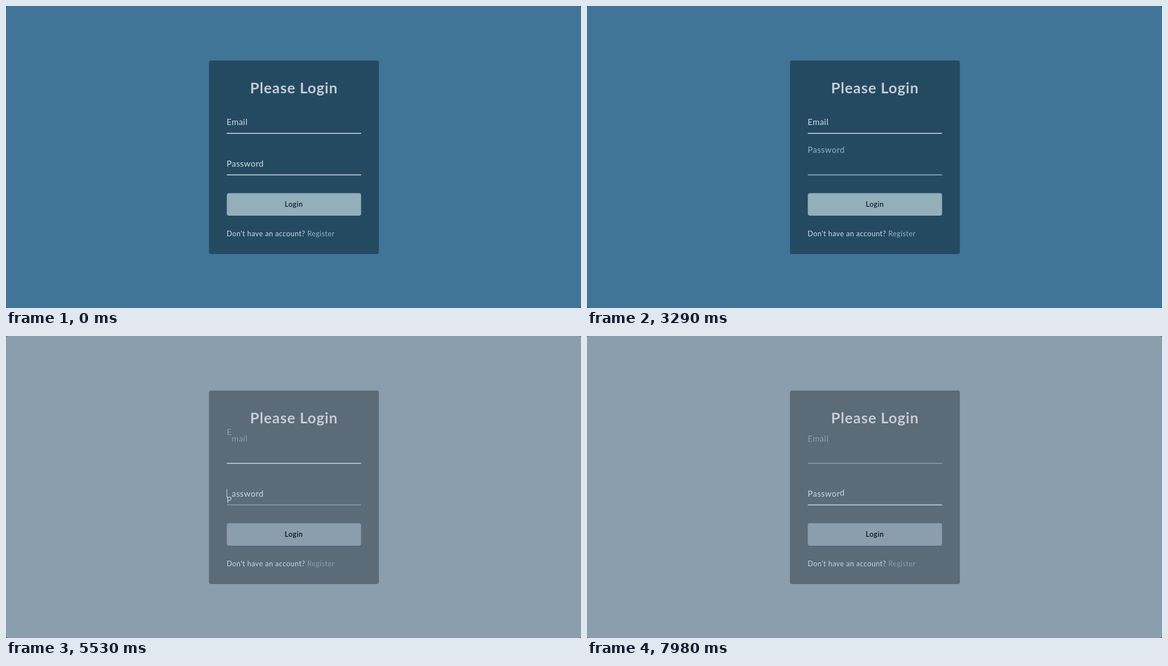
These frames come from a looping animation (1032x543 px, 8000 ms). An HTML page:

```html
<!DOCTYPE html>
<html lang="en">
<head>
<meta charset="utf-8">
<title>Login form</title>
<style>
  html, body { margin: 0; width: 100%; height: 100%; overflow: hidden; background: #2b3c4a; }
  svg {
    display: block; width: 1032px; height: 543px; font-family: Lato, sans-serif;
    --bg: #407598; --card: #244a62; --button: #93afba; --ink: #06182c;
    --title: #c6cad5; --text: #cddbe4; --accent: #8fb2c9;
  }
  svg.muted {
    --bg: #8b9eae; --card: #5b6b78; --button: #8b9eae; --ink: #05080c;
    --title: #c8cbd2; --text: #c9d5df; --accent: #8b9eae;
  }
  .bg { fill: var(--bg); }
  .card { fill: var(--card); }
  .button { fill: var(--button); }
  .title { fill: var(--title); font-size: 26.5px; font-weight: 700; letter-spacing: .9px; }
  .label { font-size: 15px; letter-spacing: .45px; }
  .small { fill: var(--text); font-size: 12.8px; letter-spacing: .45px; }
  .ink { fill: var(--ink); font-weight: 500; }
  .link { fill: var(--accent); }
  .line, .caret { fill: var(--text); }
  .line.focus { fill: var(--accent); }
</style>
</head>
<body>
<svg id="stage" viewBox="0 0 1032 543">
  <rect class="bg" width="1032" height="543" rx="3"/>
  <rect class="card" x="364.3" y="98" width="305" height="348" rx="4"/>
  <text class="title" x="516.8" y="157" text-anchor="middle">Please Login</text>
  <rect class="button" x="396.3" y="336.4" width="241" height="40.6" rx="4"/>
  <text class="small ink" x="516.6" y="361.3" text-anchor="middle">Login</text>
  <text class="small" x="396" y="413.6">Don't have an account? <tspan class="link">Register</tspan></text>
</svg>
<script>
const LOOP = 8000, STEP = 70, RISE = 24.2, DELAY = 50, DURATION = 300, BLINK = 530;
const stage = document.getElementById('stage');

// Focus changes in ms, and the spans shown in the muted palette.
const focusTimes = [[2302, 'password'], [3668, 'email'], [5510, 'password'], [7395, 'email']];
const mutedSpans = [[2310, 2940], [3710, 4410], [5530, 6230], [7420, LOOP]];
const palettes = [
  { text: [205, 219, 228], accent: [143, 178, 201] },
  { text: [201, 213, 223], accent: [139, 158, 174] }
];

function add(parent, tag, attrs, text = '') {
  const el = document.createElementNS('http://www.w3.org/2000/svg', tag);
  for (const key in attrs) el.setAttribute(key, attrs[key]);
  el.textContent = text;
  return parent.appendChild(el);
}

function makeField(name, word, baseline) {
  const line = add(stage, 'rect', { class: 'line', x: 396.3, y: baseline + 14.2, width: 241, height: 1.6 });
  const caret = add(stage, 'rect', { class: 'caret', x: 396, y: baseline - 14, width: 1, height: 16 });
  const label = add(stage, 'text', { class: 'label', x: 396, y: baseline });
  const letters = [...word].map(ch => add(label, 'tspan', {}, ch));
  return { name, line, caret, letters };
}

const fields = [makeField('email', 'Email', 214), makeField('password', 'Password', 288.6)];

// cubic-bezier(.68, -5, .265, 1.55)
function ease(p) {
  if (p <= 0) return 0;
  if (p >= 1) return 1;
  const curve = (s, a, b) => 3 * s * (1 - s) ** 2 * a + 3 * s * s * (1 - s) * b + s ** 3;
  let lo = 0, hi = 1;
  for (let i = 0; i < 24; i++) {
    const mid = (lo + hi) / 2;
    if (curve(mid, .68, .265) < p) lo = mid; else hi = mid;
  }
  return curve(lo, -5, 1.55);
}

// 0 = resting on the line, 1 = raised above it
function lift(name, index, time) {
  let from = 0, to = 0, value = 0;
  for (const [start, focused] of focusTimes) {
    const age = time - start - index * DELAY;
    if (age < 0) break;
    from = to;
    to = focused === name ? 1 : 0;
    value = from + (to - from) * ease(age / DURATION);
  }
  return value;
}

function mix(a, b, k) {
  const amount = Math.min(1, Math.max(0, k));
  return `rgb(${a.map((v, i) => Math.round(v + (b[i] - v) * amount))})`;
}

function draw(time) {
  const muted = mutedSpans.some(([from, to]) => time >= from && time < to);
  const { text, accent } = palettes[+muted];
  const [since, focused] = focusTimes.filter(([start]) => start <= time).pop() || [0, ''];
  const caretOn = Math.floor((time - since) / BLINK) % 2 === 0;
  stage.classList.toggle('muted', muted);

  for (const { name, line, caret, letters } of fields) {
    const active = name === focused;
    line.classList.toggle('focus', active);
    caret.setAttribute('visibility', active && caretOn ? 'visible' : 'hidden');
    let last = 0;
    letters.forEach((letter, i) => {
      const value = lift(name, i, time), y = -RISE * value;
      letter.setAttribute('dy', (y - last).toFixed(2));
      letter.setAttribute('fill', mix(text, accent, value));
      last = y;
    });
  }
}

const begin = performance.now();
function tick() {
  const time = (performance.now() - begin) % LOOP;
  draw(Math.floor(time / STEP) * STEP);
  requestAnimationFrame(tick);
}
tick();
</script>
</body>
</html>
```
